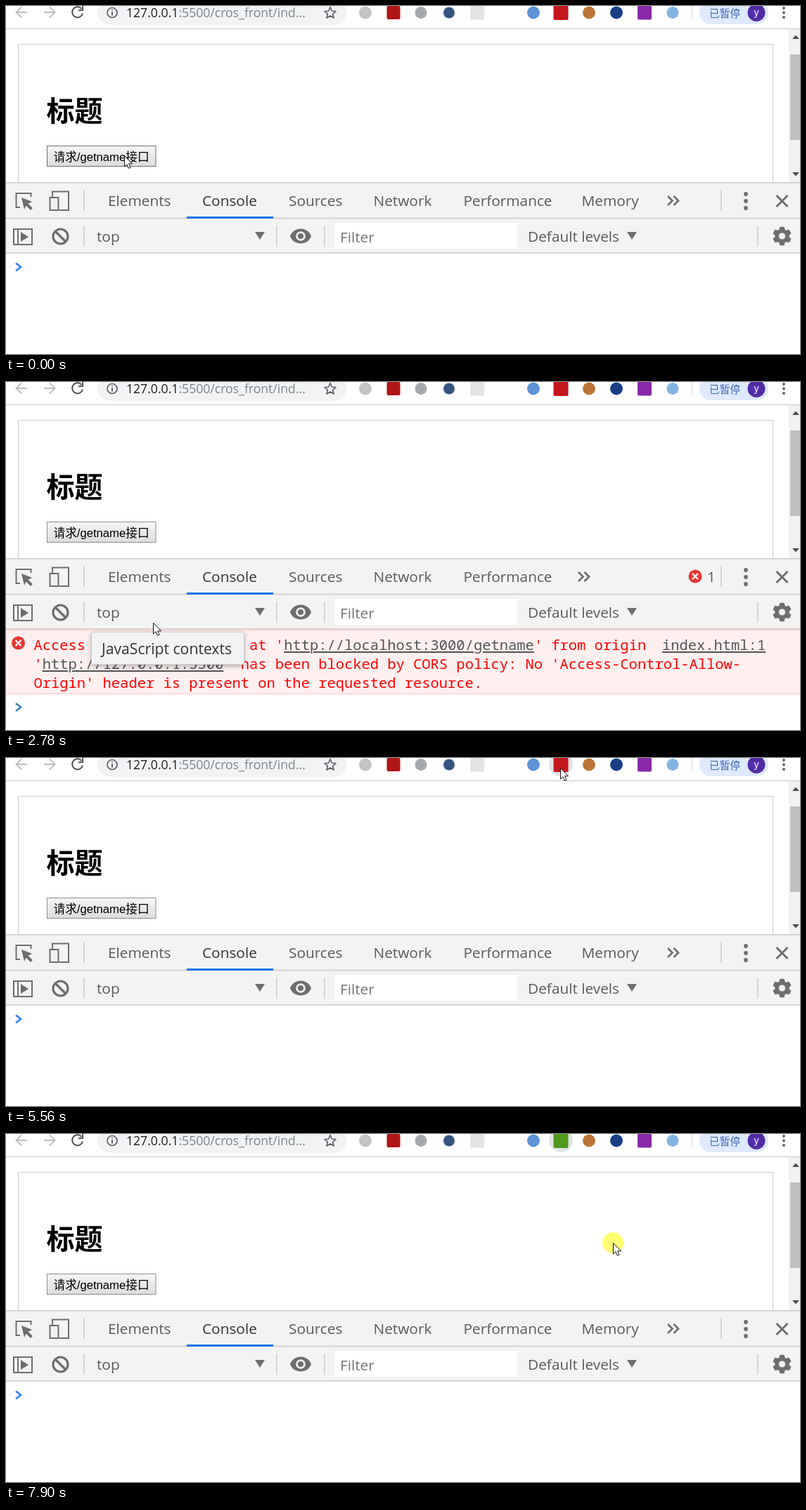
Recreate the animation shown at these times as an HTML page. Size 1129x496 px, loop 8 s.

```html
<!DOCTYPE html>
<html lang="zh-CN">
<head>
<meta charset="utf-8">
<title>CORS demo</title>
<style>
html, body { margin: 0; width: 100%; height: 100%; overflow: hidden; background: #fff; }
svg { display: block; width: 1129px; height: 496px; }
text { white-space: pre; }
.ui { font: 20.8px "Open Sans", "Noto Sans", sans-serif; fill: #5a5a5a; }
.mono { font: 20.45px "Noto Sans Mono", monospace; fill: #f00; }
.pop { font: 20px "Liberation Sans", Arial, sans-serif; fill: #444; }
.cjk { font-family: "Liberation Sans", "Noto Sans CJK SC", "Noto Sans CJK", sans-serif; }
.bold { font-weight: bold; fill: #222; }
.link { fill: #545454; text-decoration: underline; }
.line { fill: none; stroke: #6e6e6e; stroke-width: 2; }
.sep { stroke: #ccc; stroke-width: 1.5; }
.rule { stroke: #ddd; }
</style>
</head>
<body>
<svg viewBox="0 0 1129 496">
  <defs>
    <linearGradient id="face" x2="0" y2="1">
      <stop stop-color="#f6f6f6"/><stop offset="1" stop-color="#dcdcdc"/>
    </linearGradient>
    <filter id="shade" x="-10%" y="-30%" width="120%" height="160%">
      <feDropShadow dx="0" dy="2" stdDeviation="3" flood-opacity=".3"/>
    </filter>
    <filter id="glow" x="-5%" y="-5%" width="110%" height="110%">
      <feDropShadow dx="0" dy="1" stdDeviation="2.5" flood-opacity=".4"/>
    </filter>
  </defs>

  <!-- browser bar -->
  <rect x="130" y="-10" width="354" height="37" rx="18" fill="#f1f3f4"/>
  <g fill="none" stroke="#bcbec1" stroke-width="2">
    <path d="M30 9H15M22 1.5L14.5 9L22 16.5"/>
    <path d="M54 9H69M62 1.5L69.5 9L62 16.5"/>
    <path stroke="#55585c" d="M107.5 4A7.5 7.5 0 1 0 109 10.5M109 0V6H103"/>
    <circle cx="151" cy="9.5" r="7" stroke="#5f6368" stroke-width="1.7"/>
    <path stroke="#5f6368" d="M151 8.5V13.5M151 5.5V7"/>
    <path stroke="#5f6368" stroke-width="1.7" stroke-linejoin="round"
      d="M461 1.5L463.3 7L469 7.5L464.7 11.3L466 17L461 14L456 17L457.3 11.3L453 7.5L458.7 7Z"/>
  </g>
  <text x="171" y="16" class="ui" style="font-size:17.6px;fill:#80868b"><tspan fill="#202124">127.0.0.1</tspan>:5500/cros_front/ind...</text>
  <g id="marks">
    <circle id="hover" cy="9" r="17" fill="#e2e3e5"/>
  </g>
  <path d="M975.5 0V19" stroke="#d3d6da"/>
  <rect x="986" y="-8" width="98" height="34" rx="17" fill="#dfe9fb"/>
  <text x="1000" y="15.5" class="cjk" font-size="14.7" fill="#3d68b2">已暂停</text>
  <circle cx="1067" cy="9.5" r="12.5" fill="#512da8"/>
  <text x="1067" y="13.5" text-anchor="middle" class="pop" style="font-size:14px;fill:#fff">y</text>
  <g fill="#5f6368"><circle cx="1106" cy="3" r="2"/><circle cx="1106" cy="9.5" r="2"/><circle cx="1106" cy="16" r="2"/></g>
  <path d="M0 32.5H1129" stroke="#c6c6c6"/>

  <!-- page -->
  <path d="M17.5 252V54.5H1090.5V252" fill="none" stroke="#ccc"/>
  <text x="57.5" y="164" class="cjk" font-size="40" font-weight="bold">标题</text>
  <rect id="button" x="58.5" y="199.5" width="154.5" height="29" fill="url(#face)" stroke="#8f8f8f"/>
  <text x="67.5" y="221" class="cjk" font-size="16.67">请求/getname接口</text>
  <rect x="1113" y="33" width="16" height="218" fill="#f1f1f1"/>
  <rect x="1115" y="69" width="14" height="122" fill="#c1c1c1"/>
  <path d="M1118 47H1128L1123 41.5ZM1118 237H1128L1123 242.5Z" fill="#505050"/>

  <!-- devtools -->
  <rect y="251" width="1129" height="245" fill="#fff"/>
  <rect y="251" width="1129" height="102" fill="#f3f3f3"/>
  <path d="M0 251.75H1129M0 302.5H1129M0 352H1129" class="sep"/>
  <rect x="257" y="300" width="123" height="3" fill="#1a73e8"/>
  <path class="sep" d="M111 262V292M1017 262V292M111 313V343M385 313V343M453 313V343M1069 313V343"/>
  <g class="ui">
    <text x="145" y="285">Elements</text>
    <text x="279" y="285" fill="#333">Console</text>
    <text x="402" y="285">Sources</text>
    <text x="522.5" y="285">Network</text>
    <text x="650.5" y="285">Performance</text>
    <text x="818.5" y="285" id="memory">Memory</text>
    <text x="129" y="336">top</text>
    <text x="742" y="336">Default levels</text>
  </g>
  <g class="line">
    <path id="more" stroke-width="2.7" d="M-8 -6.5L-1.5 0L-8 6.5M.5 -6.5L7 0L.5 6.5"/>
    <path d="M20 287H14.5V267H35.5V272"/>
    <path d="M66 272V264.5H89V291H76"/><rect x="62.5" y="273" width="12" height="18"/>
    <rect x="11" y="318" width="26" height="22"/><path d="M17 318V340"/>
    <path d="M1095.5 270L1111.5 286M1111.5 270L1095.5 286" stroke-width="3"/>
    <g id="ban" stroke-width="3.2"><circle cx="77.5" cy="328.5" r="10.5"/><path d="M70 321L85 336"/></g>
  </g>
  <g fill="#6e6e6e">
    <path d="M22 273L37.5 279L31.5 281.5L38 288L35 291L28.5 284.5L26 290Z"/>
    <path d="M21 322L32 329L21 336Z"/>
    <circle cx="1052" cy="268" r="2.9"/><circle cx="1052" cy="278" r="2.9"/><circle cx="1052" cy="288" r="2.9"/>
    <path d="M354 322H368L361 333ZM883 322H897L890 333Z"/>
    <path d="M404 328C409 314 429 314 434 328C429 342 409 342 404 328Z"/>
    <circle cx="419" cy="328" r="6.8" fill="#f3f3f3"/><circle cx="419" cy="328" r="4"/>
    <g id="gear" transform="translate(1103.5 328)"><circle r="10"/></g>
    <circle cx="1103.5" cy="328" r="4.6" fill="#f3f3f3"/>
  </g>
  <rect x="467" y="309" width="260" height="37" fill="#fff"/>
  <text x="475" y="336.5" class="ui" style="fill:#757575">Filter</text>

  <g id="error">
    <g id="badge"><circle cx="980" cy="277" r="9.5" fill="#e53935"/>
      <path d="M976 273L984 281M984 273L976 281" stroke="#fff" stroke-width="2.3"/></g>
    <text x="997" y="285" class="ui">1</text>
    <rect y="353" width="1129" height="92" fill="#fff0f0"/>
    <path d="M0 353.5H1129M0 444.5H1129" stroke="#ffd1d1" stroke-width="1.5"/>
    <use href="#badge" x="-962.5" y="95"/>
    <g class="mono">
      <text x="39.5" y="382">Access to XMLHttpRequest at '<tspan class="link">http://localhost:3000/getname</tspan>' from origin</text>
      <text x="933" y="382" class="link">index.html:1</text>
      <text x="39.5" y="409">'<tspan class="link" id="origin">http://127.0.0.1:5500</tspan>' has been blocked by CORS policy: No 'Access-Control-Allow-</text>
      <text x="39.5" y="436">Origin' header is present on the requested resource.</text>
    </g>
  </g>
  <path id="prompt" d="M14 -5.5L21 0L14 5.5" fill="none" stroke-width="2.6"/>

  <g id="tipContext">
    <rect x="121.5" y="356.5" width="217" height="46" rx="2" fill="#f3f3f3" stroke="#ccc" filter="url(#shade)"/>
    <text x="136" y="387.5" class="ui" style="font-size:21.2px;fill:#333">JavaScript contexts</text>
  </g>
  <g id="tipClear">
    <rect x="52.5" y="356.5" width="243" height="46" rx="2" fill="#f3f3f3" stroke="#ccc" filter="url(#shade)"/>
    <text x="67.5" y="387.5" class="ui" style="fill:#333">Clear console</text>
    <text x="214" y="387.5" class="ui">Ctrl + L</text>
  </g>

  <!-- settings popup -->
  <g id="popup">
    <rect x="307.5" y="27" width="497" height="490" fill="#fff" stroke="#bbb" filter="url(#glow)"/>
    <rect x="308" y="27" width="495.5" height="54" fill="#444"/>
    <path d="M308 81H803.5" stroke="#222"/>
    <path d="M308 170H803.5V214H308ZM308 278H803.5V325H308Z" fill="#f5f5f5"/>
    <path class="rule" d="M308 106.5H804M308 170.5H804M308 214.5H804M308 278.5H804M308 325.5H804M308 390.5H804M308 453H804"/>
    <g class="pop">
      <text x="516.5" y="60.5" style="font-size:21.25px;fill:#fff">Settings</text>
      <text x="325.5" y="145">Enable cross-origin resource sharing</text>
      <text x="326" y="198" class="bold">Access-Control-Expose-Headers</text>
      <text x="326" y="253" fill="#aaa">comma-separated list of headers ...</text>
      <text x="326" y="309" class="bold">Intercepted URLs or URL patterns</text>
      <text x="326" y="428">*://*/*</text>
      <rect x="320" y="340" width="407" height="36" rx="4" fill="#f0f0f0"/>
      <rect x="331" y="340" width="386" height="36" fill="#f4f4f4"/>
      <text x="334.5" y="364" style="font-size:17.5px;fill:#aaa">URL or URL pattern</text>
    </g>
    <g fill="none" stroke="#1c2f86" stroke-width="2">
      <rect x="652" y="296.5" width="10" height="7" rx="3.5"/><rect x="658.5" y="297" width="10.5" height="7" rx="3.5"/>
    </g>
    <circle cx="765" cy="355.5" r="17.3" fill="#3c3c3c"/>
    <path d="M755.5 355.5H774.5M765 346V365" stroke="#fff" stroke-width="2.6"/>
    <path d="M755 409.5H777M762 409V406H770V409M757.5 410L759.5 435.5H772.5L774.5 410M762 414L763 431M766 414V431M770 414L769 431"
      fill="none" stroke="#555" stroke-width="1.5"/>
    <rect id="track" x="718" y="117" width="67" height="40" rx="20"/>
    <circle id="knob" cy="137" r="17.5" fill="#fff"/>
  </g>

  <!-- pointer -->
  <g id="pointer">
    <circle id="press" r="15" fill="#ff0" fill-opacity=".55"/>
    <path id="arrow" d="M.5 .5V16L4 12.7L6.3 18.3L9 17.2L6.7 11.8H11.5Z" fill="#fff" stroke="#111"/>
    <path id="hand" fill="#fff" stroke="#111" stroke-linejoin="round"
      d="M-2 1Q0 -1 2 1V8Q4 6 5.5 8.5Q7.5 7.5 8 9.5Q10 9 9.5 12Q9.5 18 7 21.5H-2.5Q-4 17 -7 13.5Q-6.5 10.5 -4 12L-2 14Z"/>
  </g>
</svg>
<script>
const LOOP = 8000;
const NS = 'http://www.w3.org/2000/svg';
const $ = id => document.getElementById(id);

function add(parent, tag, attrs) {
  const el = document.createElementNS(NS, tag);
  for (const key in attrs) el.setAttribute(key, attrs[key]);
  return parent.appendChild(el);
}

// Extension icons: centre, colour, size, round?
const icons = [
  [511, '#c4c4c4', 18, 1], [551, '#b01515', 19], [590, '#a5a8aa', 17, 1],
  [630, '#36537f', 16, 1], [670, '#e4e4e4', 20], [750, '#5d93d2', 18, 1],
  [789, '#c4161c', 21], [829, '#bd7537', 18, 1], [868, '#183f86', 18, 1],
  [908, '#8a2aa8', 20], [948, '#82b4e4', 17, 1]
];
const drawn = icons.map(([cx, fill, size, round]) => add($('marks'), 'rect', {
  x: cx - size / 2, y: 9.5 - size / 2, width: size, height: size, rx: round ? size / 2 : 2, fill
}));
const corsIcon = drawn[6];

for (let i = 0; i < 6; i++)
  add($('gear'), 'path', { d: 'M-4.5 -8L-3 -13.3H3L4.5 -8Z', transform: `rotate(${i * 60})` });

// Pointer stops: time, x, y
const path = [
  [0, 168, 213], [110, 168, 206], [1060, 162, 245], [1220, 147, 312], [1370, 133, 370],
  [1510, 130, 392], [1690, 190, 402], [1850, 300, 404], [2000, 371, 406], [2170, 436, 384],
  [2330, 390, 358], [2480, 280, 345], [2630, 212, 343], [2780, 209, 343], [2930, 82, 335],
  [3080, 77, 335], [3240, 76, 333], [3390, 76, 331], [3540, 77, 330],
  [4320, 105, 312], [4480, 230, 240], [4640, 400, 160], [4790, 590, 85], [4950, 745, 36],
  [5110, 829, 14], [5260, 795, 15], [5410, 788, 14],
  [6200, 786, 30], [6350, 775, 76], [6510, 760, 124], [6660, 756, 138],
  [7290, 848, 152], [7440, 863, 155]
];

const show = (id, on) => { $(id).style.display = on ? '' : 'none'; };

function draw(t) {
  const during = (...spans) => spans.some(([a, b]) => t >= a && t < b);
  const [, x, y] = path.findLast(step => step[0] <= t);
  const failed = during([590, 4020]);
  const enabled = t >= 6980;
  const onLink = during([1510, 2000]);
  const onCookie = during([5110, 5260]);

  $('pointer').setAttribute('transform', `translate(${x} ${y})`);
  show('press', during([440, 590], [3850, 4020], [5710, 5880], [6820, 6980], [7900, LOOP]));
  show('arrow', !onLink);
  show('hand', onLink);

  $('button').setAttribute('stroke', t < 1060 ? '#707070' : '#8f8f8f');
  show('error', failed);
  show('memory', !failed);
  $('more').setAttribute('transform', `translate(${failed ? 822 : 949} 277.5)`);
  $('prompt').setAttribute('transform', `translate(0 ${failed ? 463.5 : 372})`);
  $('prompt').setAttribute('stroke', failed ? '#3a7fb5' : '#367cf1');
  $('origin').style.fill = onLink ? '#111' : '';
  $('ban').style.stroke = during([2930, 4320]) ? '#484848' : '';

  show('tipContext', during([2780, 2930]));
  show('tipClear', during([3080, 4020]));
  $('tipClear').style.opacity = t < 3850 ? 1 : .25;

  show('hover', onCookie || t >= 5260);
  $('hover').setAttribute('cx', onCookie ? 829 : 789);
  corsIcon.setAttribute('fill', enabled ? '#4f9a1e' : '#c4161c');

  show('popup', during([5880, 7900]));
  $('track').setAttribute('fill', enabled ? '#33cd5f' : '#e6e6e6');
  $('knob').setAttribute('cx', enabled ? 765 : 738);
}

const start = performance.now();
function tick() {
  draw((performance.now() - start) % LOOP);
  requestAnimationFrame(tick);
}
tick();
</script>
</body>
</html>
```
